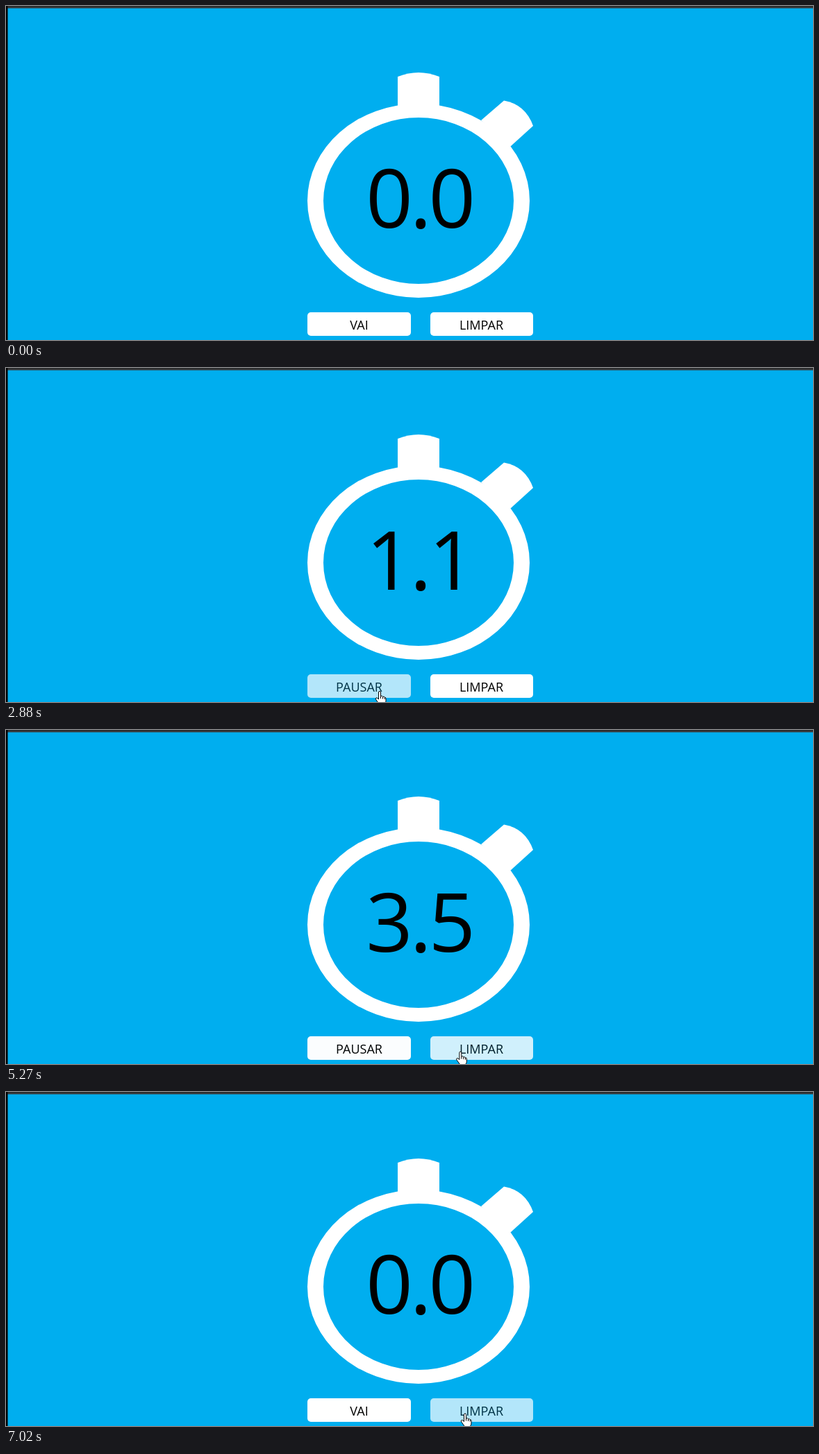
An HTML page for the animation above (8000 ms loop, 1162x482 px).

```html
<!DOCTYPE html>
<html lang="pt">
<head>
<meta charset="utf-8">
<title>Cronômetro</title>
<style>
html, body { margin: 0; width: 100%; height: 100%; overflow: hidden; background: #00aeef; }
svg { display: block; width: 1162px; height: 482px; }
text { font: 18px "Open Sans", "Noto Sans", sans-serif; text-anchor: middle; }
#count { font-size: 118px; letter-spacing: -4.2px; }
</style>
</head>
<body>
<svg viewBox="0 0 1162 482">
  <defs>
    <linearGradient id="edge" x2="0" y2="1">
      <stop stop-color="#222"/><stop offset=".65" stop-color="#3c4044"/><stop offset="1" stop-color="#00aeef"/>
    </linearGradient>
  </defs>
  <rect width="1162" height="4" fill="url(#edge)"/>
  <rect width="2.5" height="482"/>
  <ellipse cx="594" cy="281" rx="148.5" ry="130" fill="#00aeef"/>
  <g fill="#fff">
    <path fill-rule="evenodd" d="M434 281a160 140 0 0 1 320 0a160 140 0 0 1-320 0zM457 281a137 120 0 0 0 274 0a137 120 0 0 0-274 0z"/>
    <path d="M564 150V102Q594 90 624 102V150z"/>
    <path d="M684 165L717 136.5Q748 142 759 173L726 203z"/>
  </g>
  <text id="count" x="595" y="319.5">0.0</text>
  <g id="go">
    <rect x="434" y="442" width="149" height="34" rx="5" fill="#fff"/>
    <text id="label" x="508.5" y="466.5">VAI</text>
  </g>
  <g id="clear">
    <rect x="611" y="442" width="148" height="34" rx="5" fill="#fff"/>
    <text x="684.5" y="466.5">LIMPAR</text>
  </g>
  <g id="cursor" fill="#fff" stroke="#000" stroke-linejoin="round">
    <circle id="press" r="11" fill="#ff0" fill-opacity=".47" stroke="none"/>
    <path id="hand" d="M-1.5 12V2Q-1.5.5 0 .5T1.5 2V7.5Q3.5 6.5 4.5 8.3Q6.5 7.5 7.2 9.3Q9 9 9 11V14.5Q9 17 7.5 18.5V20.5H-1V18.5L-5 13Q-6.5 11-5 10Q-3.5 9.5-1.5 12zM1.5 7.5V11M4.5 8.5V11.5M7.2 9.5V12"/>
    <path id="arrow" d="M.5.5V16.5L4.2 13L6.6 18.5L9 17.5L6.6 12H11.5z"/>
  </g>
</svg>
<script>
const LOOP = 8000, ENTER = 440, START = 1770, GO = 1810, RESET = 7010, FADE = 250, SAMPLES = 50;
const $ = id => document.getElementById(id);
const show = (el, on) => el.setAttribute('visibility', on ? 'visible' : 'hidden');
const ease = p => p * p * (3 - 2 * p);

// Turning points of the pointer: time, x
const turns = [
  [ENTER, 700], [1150, 538], [4200, 538], [4290, 590], [4720, 650], [4900, 550],
  [5330, 660], [5650, 545], [6200, 545], [6340, 590], [6700, 661]
];
const buttons = { go: [434, 583], clear: [611, 759] };

function pointerX(t) {
  const next = turns.findIndex(([time]) => time > t);
  if (next < 0) return turns[turns.length - 1][1];
  const [t0, x0] = turns[next - 1], [t1, x1] = turns[next];
  return x0 + (x1 - x0) * ease((t - t0) / (t1 - t0));
}

// The pointer rises from below the buttons, then drifts up slightly to the right
const pointerY = x => 466 - (x - 538) / 50 + Math.max(0, (x - 661) / 2);

function hovered(id, t) {
  if (t < ENTER) return false;
  const x = pointerX(t), [left, right] = buttons[id];
  return x >= left && x <= right && pointerY(x) < 476;
}

// Share of the last FADE ms spent over the button, which ramps like a transition
function hoverLevel(id, t) {
  let hits = 0;
  for (let i = 0; i < SAMPLES; i++) hits += hovered(id, t - FADE * i / SAMPLES);
  return ease(hits / SAMPLES);
}

function draw(t) {
  const running = t >= GO && t < RESET;
  $('count').textContent = (running ? Math.floor((t - START) / 100) / 10 : 0).toFixed(1);
  $('label').textContent = running ? 'PAUSAR' : 'VAI';
  for (const id in buttons) $(id).setAttribute('opacity', 1 - .3 * hoverLevel(id, t));

  const visible = t >= ENTER;
  const over = hovered('go', t) || hovered('clear', t);
  show($('hand'), visible && over);
  show($('arrow'), visible && !over);
  show($('press'), [[GO, 210], [RESET, 140]].some(([end, hold]) => t >= end - hold && t < end));
  if (visible) {
    const x = pointerX(t);
    $('cursor').setAttribute('transform', `translate(${x} ${pointerY(x)})`);
  }
}

const origin = performance.now();
function tick() {
  draw((performance.now() - origin) % LOOP);
  requestAnimationFrame(tick);
}
tick();
</script>
</body>
</html>
```
